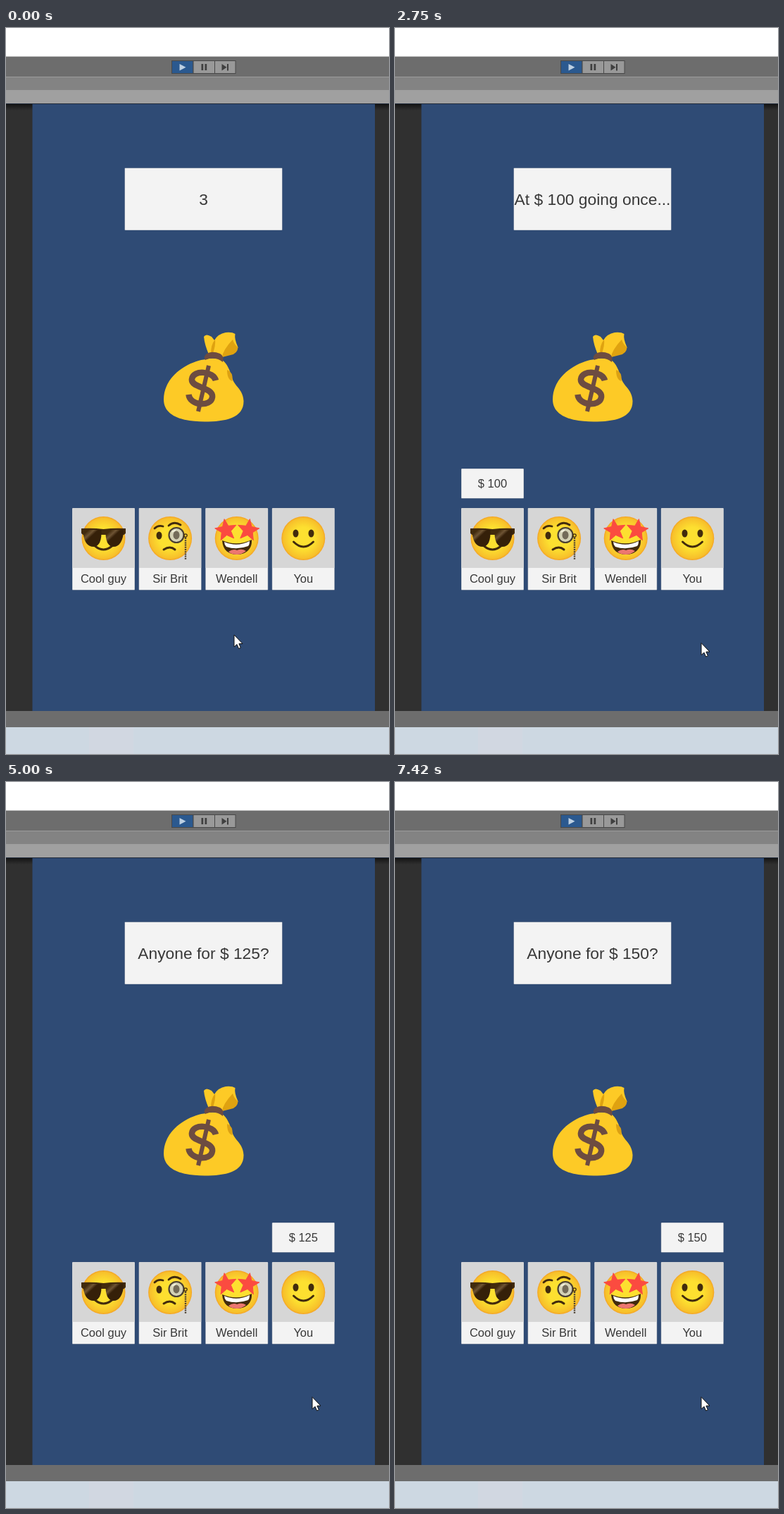
Animation, 544 px wide and 1030 px high, one loop 8000 ms. Source, as an HTML page:

```html
<!DOCTYPE html>
<html lang="en">
<head>
<meta charset="utf-8">
<title>Auction</title>
<style>
  html, body { margin: 0; width: 100%; height: 100%; overflow: hidden; background: #fff; }
  svg { display: block; width: 100%; height: 100%; }
  text { font-family: "Liberation Sans", Arial, sans-serif; font-size: 16.5px; fill: #383838; text-anchor: middle; }
  #title { font-size: 22.8px; }
  #buttons text { font-size: 32px; fill: #f4f4f4; }
  .box { fill: #f3f3f3; stroke: #263d60; stroke-opacity: .5; stroke-width: .8; }
  .line { fill: none; stroke: #422b0d; stroke-linecap: round; stroke-linejoin: round; }
  .dark { fill: #422b0d; }
</style>
</head>
<body>
<svg viewBox="0 0 544 1030">
  <defs>
    <radialGradient id="skin">
      <stop offset=".5" stop-color="#fde030"/>
      <stop offset=".92" stop-color="#f7c02b"/>
      <stop offset="1" stop-color="#f4a223"/>
    </radialGradient>
    <linearGradient id="shade" x2="0" y2="1">
      <stop stop-color="#111"/>
      <stop offset="1" stop-color="#111" stop-opacity="0"/>
    </linearGradient>
    <linearGradient id="lens" x2="1" y2="1">
      <stop offset=".15" stop-color="#422b0d"/>
      <stop offset=".3" stop-color="#6e5434"/>
      <stop offset=".42" stop-color="#352009"/>
    </linearGradient>
  </defs>

  <!-- editor window -->
  <rect width="544" height="1030" fill="#fff"/>
  <rect y="40.5" width="544" height="29" fill="#6d6d6d"/>
  <rect y="69.5" width="544" height="18.5" fill="#838383"/>
  <rect y="88" width="544" height="19.5" fill="#a0a0a0"/>
  <rect y="107.5" width="544" height="862" fill="#303030"/>
  <rect y="107" width="544" height="10" fill="url(#shade)"/>
  <rect x="37.5" y="107.5" width="486.5" height="861.5" fill="#2f4b75"/>
  <rect y="107" width="544" height="1" fill="#222c3b"/>
  <rect y="969" width="544" height="23" fill="#6d6d6d"/>
  <rect y="992" width="544" height="38" fill="#cdd8e2"/>
  <rect x="118" y="992" width="63" height="38" fill="#d1d7e1"/>
  <g stroke="#484848">
    <rect x="235.5" y="46.5" width="30.5" height="18" fill="#2b598f"/>
    <rect x="266" y="46.5" width="30.5" height="18" fill="#999"/>
    <rect x="296.5" y="46.5" width="29.5" height="18" fill="#999"/>
  </g>
  <path d="M246.500 51v9.500l9-4.750z" fill="#bdd0e2"/>
  <path d="M277.500 51h2.700v9h-2.700zm5 0h2.700v9h-2.700zM306.500 51v9.500l7-4.750zm7.500 0h2v9.500h-2z" fill="#3f3f3f"/>

  <!-- auction panel -->
  <rect class="box" x="168.500" y="198.500" width="224" height="88.500" rx="1"/>
  <text id="title" x="280.500" y="251"></text>

  <!-- money bag -->
  <path fill="#fdca26" d="M284 470C262 472 224 492 224 527C224 552 254 558.500 282 558.500C312 558.500 338 553 337.500 529C336.500 513 326 509 322 499C318 485 314 476 307 471Q295 467 284 470Z"/>
  <path fill="#dca113" d="M314 485Q323 488 321.500 501Q314 499 314 485Z"/>
  <path fill="#fdca26" d="M288 463Q282 449 281 438Q284 433 292 438L296 443Q301 434 312 432Q321 431 325.500 434Q324 441 329.500 453Q328 459 319 461L307 467Q297 459 288 463Z"/>
  <path fill="#dfa210" d="M291 462Q291 449 297 442Q298 450 294 461ZM307 467Q308 457 322 442Q324 449 329.500 453Q329 462 319 464Z"/>
  <path fill="#6d4c41" d="M284 463Q292 457 304 462Q310 465 308 474Q296 465 283 471Q280 467 284 463Z"/>
  <g fill="none" stroke="#6d4c41">
    <path stroke-width="6" d="M288 479L273 544"/>
    <path stroke-width="8.500" d="M298 500C295 487 266 484 264 498C262 511 295 509 293 524C291 538 261 536 259.500 520"/>
  </g>

  <g id="cards"></g>
  <g id="faces">
    <g transform="translate(138.500 724)">
      <path class="line" stroke-width="3" d="M-12 11Q0 21 12 11"/>
      <path class="dark" d="M-31.500-14Q-15-15 0-13Q15-15 31.500-14V-7L29-5H-29L-31.500-7Z"/>
      <path id="shadeLens" fill="url(#lens)" d="M-29-12H-3Q-2 11-14 12Q-27 12-29-8Z"/>
      <path fill="url(#lens)" d="M3-12H29Q27 12 14 12Q2 11 3-12Z"/>
    </g>
    <g transform="translate(233 724)">
      <path class="line" stroke-width="2.800" d="M-22-14Q-17-19-10-17M-2-18Q6-25 15-19"/>
      <ellipse class="dark" cx="-15.500" cy="-4" rx="4" ry="5.500"/>
      <circle cx="9" cy="-4.500" r="10.500" fill="#d4d2b6" stroke="#4b4032" stroke-width="2.200"/>
      <ellipse cx="9" cy="-4.500" rx="4.500" ry="6" fill="#736b59"/>
      <path d="M3-9L8-12" stroke="#f4f2df" stroke-width="2"/>
      <circle cx="22" cy="-4" r="2.200" fill="none" stroke="#422b0d" stroke-width="1.300"/>
      <path d="M22-1V31" stroke="#4b4032" stroke-width="2.400" stroke-dasharray="2 1.200"/>
      <path class="line" stroke-width="3" d="M-9 16Q0 10 7 16"/>
    </g>
    <g transform="translate(328 724)">
      <path class="dark" d="M-21 3Q0 12 21 2C22 16 12 23 0 23S-20 17-21 3Z"/>
      <path fill="#fff" d="M-18 5Q0 13 18 4Q18 9 16 11Q0 17-15 12Q-18 9-18 5Z"/>
      <path fill="#ed7770" d="M-12 19Q-5 14 0 17Q7 14 13 18Q7 23 0 23Q-8 23-12 19Z"/>
      <g id="stars" fill="#fb4b40"></g>
    </g>
    <g transform="translate(422.500 724)">
      <ellipse class="dark" cx="-11" cy="-7" rx="4" ry="5.500"/>
      <ellipse class="dark" cx="11" cy="-7" rx="4" ry="5.500"/>
      <path class="line" stroke-width="3" d="M-14 5Q0 19 14 5"/>
    </g>
  </g>
  <g id="bids"></g>

  <g id="buttons" stroke-width="1">
    <rect x="83" y="838.500" width="134" height="88.500" rx="1" fill="#d23240" stroke="#8d3345"/>
    <text x="150" y="893.500">Pass</text>
    <rect x="344.500" y="838.500" width="134" height="88.500" rx="1" fill="#249d3e" stroke="#1d3d3b"/>
    <rect id="tint" x="345" y="839" width="133" height="87.500"/>
    <text x="411" y="893.500">Bid</text>
  </g>
  <path id="cursor" d="M0 0V17L4 13.500L6.600 19.500L9.400 18.300L6.900 12.500H12Z" fill="#fff" stroke="#111"/>
</svg>
<script>
const LOOP = 8000;
const $ = id => document.getElementById(id);
const cardX = i => 94 + 94.6 * i;

const players = ["Cool guy", "Sir Brit", "Wendell", "You"];
$("cards").innerHTML = players.map((name, i) => `
  <rect class="box" x="${cardX(i)}" y="681" width="89" height="116.500" rx="1"/>
  <rect x="${cardX(i) + .4}" y="681.400" width="88.200" height="84.600" fill="#d6d6d6"/>
  <circle cx="${cardX(i) + 44.5}" cy="724" r="31" fill="url(#skin)"/>
  <text x="${cardX(i) + 44.5}" y="787">${name}</text>`).join("");

function star(cx, cy, turn) {
  const points = Array.from({ length: 10 }, (_, k) => {
    const r = k % 2 ? 7 : 16, a = turn + (k / 5 - .5) * Math.PI;
    return `${cx + r * Math.cos(a)},${cy + r * Math.sin(a)}`;
  });
  return `<polygon points="${points.join(" ")}" stroke="#fb4b40" stroke-linejoin="round"/>`;
}
$("stars").innerHTML = star(-15.5, -11.5, -.15) + star(16, -11.5, .15);

// [start, text]
const titles = [
  [0, "3"], [580, "Starting at $ 100."], [2580, "At $ 100 going once..."],
  [3745, "Anyone for $ 125?"], [6745, "Anyone for $ 150?"]
];
// [start, end, player, amount]
const bids = [
  [1580, 2580, 3, 100], [2745, 3745, 0, 100], [4915, 5915, 3, 125],
  [5745, 6745, 1, 125], [7335, LOOP, 3, 150]
];
// [buttons shown, mouse down, mouse up]
const rounds = [[580, 1420, 1580], [3745, 4750, 4915], [6745, 7170, 7335]];
// [time, x, y]
const path = [[80, 324, 861], [920, 440, 756], [1000, 440, 756], [1400, 435, 872.5]];

$("bids").innerHTML = bids.map(([, , who, amount]) => `
  <g><rect class="box" x="${cardX(who)}" y="625" width="89" height="42.500" rx="1"/>
  <text x="${cardX(who) + 44.5}" y="652">$ ${amount}</text></g>`).join("");

const show = (el, on) => el.setAttribute("visibility", on ? "visible" : "hidden");
const clamp = v => Math.max(0, Math.min(1, v));

function cursorAt(t) {
  let [, x, y] = path[0];
  for (let i = 1; i < path.length; i++) {
    const [a, x0, y0] = path[i - 1], [b, x1, y1] = path[i];
    if (t < a) break;
    const p = clamp((t - a) / (b - a)), e = p * p * (3 - 2 * p);
    x = x0 + (x1 - x0) * e;
    y = y0 + (y1 - y0) * e;
  }
  return [x, y];
}

function draw(t) {
  const text = titles.filter(([start]) => t >= start).pop()[1];
  if ($("title").textContent !== text) $("title").textContent = text;
  bids.forEach(([a, b], i) => show($("bids").children[i], t >= a && t < b));

  const [x, y] = cursorAt(t);
  $("cursor").setAttribute("transform", `translate(${x} ${y})`);

  const round = rounds.find(([a, , b]) => t >= a && t < b);
  show($("buttons"), round);
  if (round) {
    const hover = x > 345 && y > 838 ? .04 : 0;
    $("tint").setAttribute("opacity", hover + .18 * clamp((t - round[1]) / 100));
  }
}

const begin = performance.now();
function tick() {
  draw((performance.now() - begin) % LOOP);
  requestAnimationFrame(tick);
}
tick();
</script>
</body>
</html>
```
